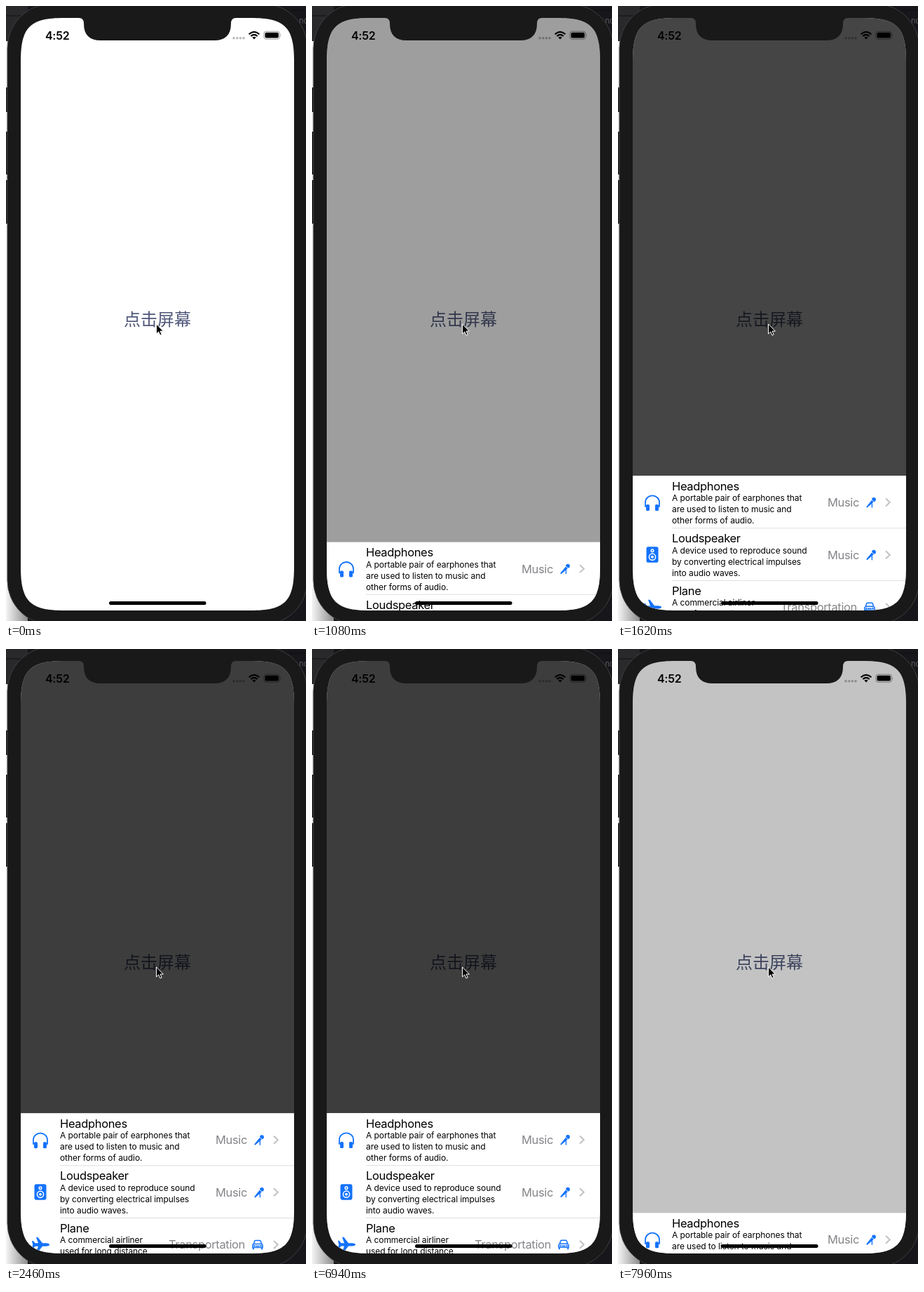
Write an HTML page that moves like this. It is 428 px wide and 876 px high and loops after 8000 ms.

```html
<!DOCTYPE html>
<html lang="en">
<head>
<meta charset="utf-8">
<title>Bottom sheet</title>
<style>
  html, body { margin: 0; width: 100%; height: 100%; overflow: hidden; background: #1c1c1e; }
  svg { display: block; width: 428px; height: 876px; }
  text { font-family: Inter, Roboto, sans-serif; }
  .title, .kind { font-size: 16.5px; letter-spacing: -.35px; }
  .kind { fill: #85858a; text-anchor: end; }
  .note { font-size: 12px; letter-spacing: -.08px; }
  .hint { font: 24px "Noto Sans CJK SC", "Noto Sans CJK", sans-serif; fill: #50587a; }
  .time { font-size: 16px; font-weight: 600; letter-spacing: -.3px; }
  .line { fill: none; stroke: #1472fb; stroke-linecap: round; stroke-linejoin: round; }
  .blue { fill: #1472fb; }
</style>
</head>
<body>
<svg viewBox="0 0 428 876">
  <defs>
    <linearGradient id="shade">
      <stop offset="0" stop-color="#f4f4f4"/>
      <stop offset="1" stop-color="#8c8c8c"/>
    </linearGradient>
    <clipPath id="screen">
      <path d="M21 79C21 30 34 17 83 17H349C398 17 411 30 411 79V799C411 848 398 861 349 861H83C34 861 21 848 21 799Z"/>
    </clipPath>

    <g id="headphones">
      <path class="line" stroke-width="1.8" d="M-10 6V0A10 9.6 0 0 1 10 0V6"/>
      <rect class="blue" x="-9" y="3" width="5" height="9" rx="1.6"/>
      <rect class="blue" x="4" y="3" width="5" height="9" rx="1.6"/>
    </g>
    <g id="speaker">
      <rect class="blue" x="-8.5" y="-11.5" width="17" height="22.5" rx="2.8"/>
      <g fill="none" stroke="#fff" stroke-width="1.5">
        <circle cy="-6" r="1.8"/>
        <circle cy="3" r="4.6"/>
      </g>
      <circle cy="3" r="1.9" fill="#fff"/>
    </g>
    <path id="plane" class="blue" d="M13 0C13 1.5 10.5 2.2 8 2.2H3L-3.5 10.5H-6L-3 2.2H-7.5L-10.2 5.6H-12L-10.8 0L-12 -5.6H-10.2L-7.5 -2.2H-3L-6 -10.5H-3.5L3 -2.2H8C10.5 -2.2 13 -1.5 13 0Z"/>
    <g id="mic">
      <path class="blue" d="M1 -3.2L3.8 -.4L-5.6 7.6L-6.8 6.4Z"/>
      <circle class="blue" cx="4" cy="-4" r="2.9"/>
      <path d="M.8 -4L4.2 -.4" stroke="#fff" stroke-width=".8"/>
      <path class="line" stroke-width="1.4" d="M1.4 2V7"/>
    </g>
    <g id="car">
      <path class="line" stroke-width="1.5" d="M-5.8 -1L-4.3 -5.2Q-4 -6 -3 -6H3Q4 -6 4.3 -5.2L5.8 -1Q7.2 -.2 7.2 1.4V4H-7.2V1.4Q-7.2 -.2 -5.8 -1ZH5.8M-2.2 2H2.2"/>
      <circle class="blue" cx="-4.6" cy="1.7" r="1.2"/>
      <circle class="blue" cx="4.6" cy="1.7" r="1.2"/>
      <path class="line" stroke-width="2.2" d="M-6.2 5.4V6M6.2 5.4V6"/>
    </g>
  </defs>

  <!-- desktop behind the phone -->
  <rect width="428" height="876" fill="#17171b"/>
  <rect width="31" height="50" fill="#29292c"/>
  <rect y="50" width="31" height="826" fill="url(#shade)"/>
  <path d="M0 14H31M395 6H428" stroke="#111" />
  <text x="418" y="25" font-size="11" fill="#5c5c5e">no</text>

  <!-- phone body -->
  <g fill="#202022">
    <rect x="-1" y="116" width="5" height="35" rx="1"/>
    <rect x="-1" y="179" width="5" height="61" rx="1"/>
    <rect x="-1" y="248" width="5" height="62" rx="1"/>
  </g>
  <rect x="2" y="-3" width="428" height="884" rx="63" fill="#191919" stroke="#3f3f42"/>

  <g clip-path="url(#screen)">
    <rect x="21" y="17" width="390" height="844" fill="#fff"/>
    <text class="hint" x="168" y="455">点击屏幕</text>
    <rect id="dim" x="21" y="17" width="390" height="844"/>
    <g id="sheet"><rect x="21" width="390" height="260" fill="#fff"/></g>
  </g>

  <!-- status bar, notch, home bar -->
  <path d="M104 16V17Q111 17 111 25Q111 49 135 49H297Q321 49 321 25Q321 17 328 17V16Z" fill="#191919"/>
  <text class="time" x="56" y="47.5">4:52</text>
  <g opacity=".27">
    <circle cx="325" cy="45.7" r="1.8"/><circle cx="329.8" cy="45.7" r="1.8"/>
    <circle cx="334.4" cy="45.7" r="1.8"/><circle cx="339" cy="45.7" r="1.8"/>
  </g>
  <g fill="none" stroke="#000" stroke-width="2.2">
    <path d="M346.6 40.2Q354 33.6 361.4 40.2M349.3 43Q354 38.9 358.7 43"/>
  </g>
  <path d="M351.4 44.8Q354 42.8 356.6 44.8L354 47.4Z"/>
  <rect x="367.9" y="36.2" width="22.6" height="11" rx="3.2" fill="none" stroke="#000" stroke-opacity=".4"/>
  <path d="M391.6 40Q393 41.7 391.6 43.5Z" opacity=".45"/>
  <rect x="369.5" y="37.8" width="19.4" height="7.8" rx="1.8"/>
  <rect x="147" y="848" width="138.5" height="5" rx="2.5"/>

  <!-- pointer -->
  <circle id="ring" cx="215.5" cy="454" r="21.3" fill="none" stroke="#000" stroke-width="2"/>
  <path d="M214.5 453V467L217.7 464L219.9 469L222.2 468L220 463.2H224.4Z" stroke="#fff" stroke-width="1" stroke-linejoin="round"/>
</svg>

<script>
const LOOP = 8000, OPEN = 916, CLOSE = 7695;
const TOP = 661, TRAVEL = 206, DIM = .76, PITCH = 74.67;
const SLOW = 4.72, FAST = 60;

const rows = [
  { icon: 'headphones', title: 'Headphones', kind: 'Music', badge: 'mic', kindEnd: 344,
    note: ['A portable pair of earphones that', 'are used to listen to music and', 'other forms of audio.'] },
  { icon: 'speaker', title: 'Loudspeaker', kind: 'Music', badge: 'mic', kindEnd: 344,
    note: ['A device used to reproduce sound', 'by converting electrical impulses', 'into audio waves.'] },
  { icon: 'plane', title: 'Plane', kind: 'Transportation', badge: 'car', kindEnd: 341,
    note: ['A commercial airliner', 'used for long distance', 'travel.'] }
];

const byId = id => document.getElementById(id);
const sheet = byId('sheet'), dim = byId('dim'), ring = byId('ring');
const label = (kind, x, y, s) => `<text class="${kind}" x="${x}" y="${y}">${s}</text>`;
const symbol = (id, x, y) => `<use href="#${id}" x="${x}" y="${y}"/>`;

const rowMarkup = (r, i) => `<g transform="translate(0 ${i * PITCH})">
  ${symbol(r.icon, 49, 38)}
  ${label('title', 77, 20.5, r.title)}
  ${r.note.map((s, n) => label('note', 77, 36 + 16 * n, s)).join('')}
  ${label('kind', r.kindEnd, 44, r.kind)}
  ${symbol(r.badge, r.badge === 'car' ? 359 : 361, 38)}
  <path d="M382 32.5L387.8 38L382 43.5" fill="none" stroke="#c2c2c6" stroke-width="2"/>
  <path d="M77 74.7H411" stroke="#dedee0"/>
</g>`;
sheet.insertAdjacentHTML('beforeend', rows.map(rowMarkup).join(''));

// Overdamped spring: share of the way covered after ms.
function spring(ms) {
  if (ms <= 0) return 0;
  const s = ms / 1000;
  return 1 - (FAST * Math.exp(-SLOW * s) - SLOW * Math.exp(-FAST * s)) / (FAST - SLOW);
}

const within = (t, from, to) => t >= from && t < to;

function draw(t) {
  const shown = spring(t - OPEN) - spring(t - CLOSE);
  sheet.setAttribute('transform', `translate(0 ${(TOP + TRAVEL * (1 - shown)).toFixed(2)})`);
  dim.setAttribute('opacity', (DIM * shown).toFixed(4));
  const pressed = within(t, 500, 640) || within(t, 7260, 7540);
  ring.setAttribute('visibility', pressed ? 'visible' : 'hidden');
}

const start = performance.now();
function tick() {
  draw((performance.now() - start) % LOOP);
  requestAnimationFrame(tick);
}
tick();
</script>
</body>
</html>
```
